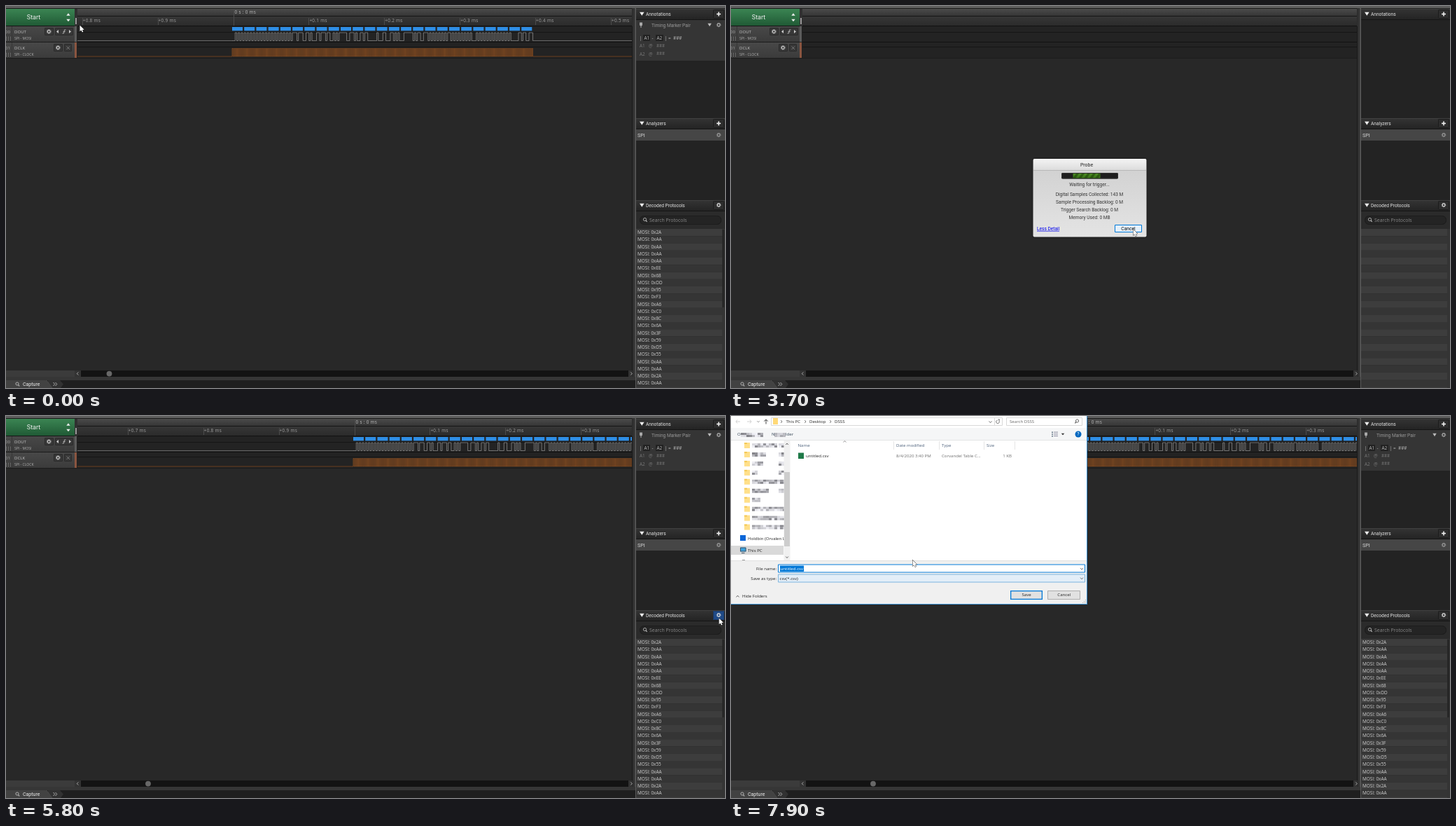
Recreate the animation shown at these times as an HTML page with a canvas. Size 1027x545 px, loop 8 s.

```html
<!DOCTYPE html>
<html lang="en">
<head>
<meta charset="utf-8">
<title>Signal capture</title>
<style>
html, body { margin: 0; width: 100%; height: 100%; overflow: hidden; background: #282828; }
canvas { display: block; }
</style>
</head>
<body>
<canvas id="stage" width="1027" height="545"></canvas>
<script>
const c = document.getElementById('stage').getContext('2d');
const UI = 'Roboto, sans-serif', OPEN = '"Open Sans", sans-serif';
const LOOP = 8000, BYTE = 17.22, BIT = BYTE / 8;
const bytes = [0x2A, 0xAA, 0xAA, 0xAA, 0xAA, 0xEE, 0x68, 0xDD, 0x95, 0xF3, 0xA6, 0xC0, 0x8C,
  0x6A, 0x3F, 0x59, 0xD5, 0x55, 0xAA, 0xAA, 0x2A, 0xAA, 0xAA, 0x83, 0x67];

// start time, pointer x, pointer y
const pointer = [[0, 105, 27], [200, 24, 11], [400, 36, 8], [600, 29, 5], [800, 215, 144],
  [2800, 500, 283], [3100, 607, 342], [3400, 591, 329], [3700, 574, 318], [4000, 581, 309],
  [4300, 565, 306], [4600, 561, 304], [4900, 529, 91], [5200, 828, 324], [5500, 1018, 298],
  [5800, 1018, 288], [6400, 1018, 287], [6700, 972, 319], [7300, 864, 319], [7600, 500, 231],
  [7900, 259, 205]];
// start time, bar offset, samples
const progress = [[800, 5, 10], [2800, 41, 53], [3100, 0, 83], [3400, 0, 113],
  [3700, 16, 143], [4000, 30, 173], [4300, 12, 203]];

const at = (steps, t) => steps.filter(s => s[0] <= t).pop();
const noise = n => Math.abs(Math.sin(n * 12.9898) * 43758.5) % 1;

function box(x, y, w, h, fill, edge, r = 0) {
  c.beginPath();
  c.roundRect(x, y, w, h, r);
  c.fillStyle = fill;
  c.fill();
  if (edge) {
    c.beginPath();
    c.roundRect(x + .5, y + .5, w - 1, h - 1, r);
    c.strokeStyle = edge;
    c.lineWidth = 1;
    c.stroke();
  }
}
function fade(y, h, from, to) {
  const g = c.createLinearGradient(0, y, 0, y + h);
  g.addColorStop(0, from);
  g.addColorStop(1, to);
  return g;
}
function text(s, x, y, color, size = 6.6, font = UI, align = 'left', space = 0) {
  c.font = size + 'px ' + font;
  c.letterSpacing = space + 'px';
  c.textAlign = align;
  c.fillStyle = color;
  c.fillText(s, x, y + size * .35);
}
function line(color, width, ...pts) {
  c.beginPath();
  for (let i = 0; i < pts.length; i += 2) c.lineTo(pts[i], pts[i + 1]);
  c.strokeStyle = color;
  c.lineWidth = width;
  c.stroke();
}
function poly(color, ...pts) {
  c.beginPath();
  for (let i = 0; i < pts.length; i += 2) c.lineTo(pts[i], pts[i + 1]);
  c.fillStyle = color;
  c.fill();
}
function disc(x, y, r, color) {
  c.beginPath();
  c.arc(x, y, r, 0, 7);
  c.fillStyle = color;
  c.fill();
}
function ring(x, y, r, color, width) {
  c.beginPath();
  c.arc(x, y, r, 0, 7);
  c.strokeStyle = color;
  c.lineWidth = width;
  c.stroke();
}
function gear(x, y, color = '#ccc') {
  ring(x, y, 1.9, color, 1.1);
  c.setLineDash([1.1, 1.1]);
  ring(x, y, 2.8, color, 1);
  c.setLineDash([]);
}
function lens(x, y, color, side = -1) {
  ring(x, y - .5, 2.1, color, .9);
  line(color, 1.1, x - side * 1.5, y + 1, x - side * 3.2, y + 2.8);
}
const down = (x, y, w, h, color = '#eee') => poly(color, x - w, y - h, x + w, y - h, x, y + h);
const chevron = (x, y, w, h, color = '#555') => line(color, .8, x - w, y - h, x, y + h, x + w, y - h);

function channel(y, id, name, role) {
  box(0, y, 98, 22, fade(y, 22, '#484848', '#3b3b3b'));
  box(0, y + 22, 98, 1, '#1b1b1b');
  box(8, y, 1, 22, '#363636');
  text(id, -1, y + 8, '#aaa', 6, OPEN);
  for (let i = 0; i < 9; i++) box(i % 3 * 3, y + 15 + (i / 3 | 0) * 2, 1, 1, '#888');
  text(name, 12, y + 8, '#c4c4c4', 6.1, OPEN);
  text(role, 12, y + 17, '#b4b4b4', 5.1, OPEN);
}
function channels() {
  const button = (x, y, w) => box(x, y, w, 11, '#373737', '#2b2b2b', 1);
  channel(29, '00', 'DOUT', 'SPI - MOSI');
  button(55, 31, 13);
  gear(61.3, 36.5);
  button(70, 31, 26);
  poly('#ccc', 75, 34, 75, 39, 72, 36.5);
  poly('#ccc', 90, 34, 90, 39, 93, 36.5);
  line('#bbb', .9, 80.5, 39, 82.5, 39, 83.5, 34, 85.5, 34);
  line('#bbb', .8, 81.5, 36.5, 84.7, 36.5);
  channel(52, '01', 'DCLK', 'SPI - CLOCK');
  button(68, 54, 13);
  gear(74.3, 59.5);
  button(83, 54, 11);
  line('#888', .8, 86.5, 57.5, 91, 62);
  line('#888', .8, 91, 57.5, 86.5, 62);
  box(98, 29, 4, 22, '#5c5c5c');
  box(98, 52, 4, 22, '#8a5540');
  box(101, 29, 1, 45, '#222');
}
function lanes() {
  box(102, 4, 792, 10, fade(4, 10, '#4b4b4b', '#363636'));
  box(102, 14, 792, 1, '#161616');
  box(102, 15, 792, 13, fade(15, 13, '#373737', '#2b2b2b'));
  box(102, 28, 792, 1, '#111');
  for (const y of [29, 52]) {
    box(102, y, 792, 22, '#232323');
    box(102, y + (y === 29 ? 8 : 6), 792, 1, '#151515');
    box(102, y + 22, 792, 1, '#121212');
  }
  box(99, 17, 2, 9, '#999');
  box(895, 17, 2, 9, '#999');
}
function trace(x0) {
  const zero = x0 + 2, end = x0 + 25 * BYTE - 1;
  c.save();
  c.beginPath();
  c.rect(102, 4, 792, 70);
  c.clip();
  for (let k = -3; k < 6; k++) {
    const x = zero + k * 107.9;
    box(Math.floor(x), k ? 17 : 4, 1, k ? 10 : 24, '#4c4c4c');
    if (k) text(`+0.${(k + 10) % 10} ms`, x + .5, 20.5, '#a0a0a0', 6.4, OPEN, 'left', .3);
  }
  text('0 s : 0 ms', zero + 1.5, 9, '#bbb', 6.4, OPEN, 'left', .3);
  const data = [x0, 49.5], clock = [];
  let level = 49.5;
  bytes.forEach((b, i) => {
    const x = x0 + i * BYTE;
    box(x, 30, 15, 5.3, '#2e8ee6');
    for (let j = 0; j < 8; j++) {
      const p = x + j * BIT, next = b >> (7 - j) & 1 ? 38 : 49.5;
      data.push(p, level, p, next);
      level = next;
      clock.push(p, 72, p, 60.5, p + BIT / 2, 60.5, p + BIT / 2, 72);
    }
  });
  data.push(end, level, end, 49.5);
  for (const [from, to] of [[102, x0], [end, 894]]) {
    line('#858585', .7, from, 49.5, to, 49.5);
    line('#8a4a1a', .7, from, 72, to, 72);
  }
  line('#a0a0a0', .65, ...data);
  line('#c2651f', .5, ...clock);
  c.restore();
}
function header(y, name, lit) {
  box(900, y, 127, 16, fade(y, 16, '#343434', '#232323'));
  box(900, y, 127, 1, '#404040');
  box(900, y + 15, 127, 1, '#151515');
  down(908.3, y + 7.3, 3.3, 2.5);
  text(name, 914, y + 8, '#e2e2e2', 6.6);
  box(1010, y + 1, 16, 13, lit ? '#1f4a87' : '#2d2d2d', lit ? '#1b3a66' : '#1c1c1c', 1);
}
function sidebar(full, lit) {
  box(894, 3, 6, 542, '#2a2a2a');
  box(894, 29, 1, 491, '#191919');
  box(895, 3, 3, 542, '#323232');
  box(898, 3, 1, 542, '#4a4a4a');
  box(899, 3, 1, 542, '#5a5a5a');
  box(900, 3, 127, 542, '#232323');
  header(4, 'Annotations');
  header(160, 'Analyzers');
  header(277, 'Decoded Protocols', lit);
  for (const y of [11.5, 167.5]) {
    box(1015, y - .8, 6, 1.6, '#eee');
    box(1017.2, y - 3, 1.6, 6, '#eee');
  }
  gear(1018, 284, '#ddd');
  box(900, 176, 127, 16, '#464646');
  text('SPI', 902, 184, '#d5d5d5', 7.2);
  gear(1018, 184, '#999');
  box(900, 293, 127, 25, '#2b2b2b');
  box(905, 299, 117, 13, '#242424', '#1c1c1c', 6);
  lens(912.5, 305, '#bbb');
  text('Search Protocols', 919, 305.3, '#888', 6.9, OPEN);
  for (let i = 0; i < 23; i++) {
    const y = 318 + i * 10.24;
    box(900, y, 123, 10.24, i % 2 ? '#353535' : '#3d3d3d');
    if (full && i < 22) {
      const hex = bytes[i].toString(16).toUpperCase();
      text('MOSI: 0x' + hex, 902, y + 5, '#d0d0d0', 6.4, OPEN);
    }
  }
  box(1023, 318, 4, 227, '#343434');
  if (!full) return;
  box(1023, 319, 3, 111, '#262626', null, 1);
  box(900, 20, 127, 58, '#353535');
  poly('#aaa', 905, 23.5, 909, 23.5, 909, 27.5, 907.5, 28.5, 907.5, 31, 906.5, 31, 906.5, 28.5, 905, 27.5);
  text('Timing Marker Pair', 922, 27.3, '#999');
  down(1005, 27, 2.7, 2.2, '#bbb');
  gear(1018, 27, '#aaa');
  box(910, 41, 10, 9, '#222');
  box(928, 41, 11, 9, '#222');
  for (const [s, x] of [['|', 905], ['A1', 911.5], ['-', 922.5], ['A2', 929.5], ['|', 941], ['=', 946], ['###', 953]])
    text(s, x, 45.5, '#bbb', 6.4, OPEN);
  ['A1', 'A2'].forEach((s, i) => {
    const y = 57 + i * 11.3;
    text(s, 905, y, '#777', 6.4, OPEN);
    text('@', 918, y, '#777', 6.4, OPEN);
    text('###', 929, y, '#777', 6.2, OPEN);
  });
}
function footer(thumb) {
  box(0, 520, 98, 9, '#3b3b3b');
  box(98, 520, 796, 9, '#333');
  box(107, 520, 782, 9, '#131313');
  line('#bbb', .9, 103.3, 522.5, 101.3, 524.5, 103.3, 526.5);
  line('#bbb', .9, 892.3, 522.5, 894.3, 524.5, 892.3, 526.5);
  if (thumb) disc(thumb, 524.6, 3.9, '#686868');
  box(0, 529, 899, 5, '#363636');
  box(0, 534, 899, 11, '#1f1f1f');
  poly('#313131', 60, 534, 77, 534, 82, 539.5, 78, 545, 60, 545);
  poly('#424242', 0, 534, 58, 534, 66, 545, 0, 545);
  line('#505050', .8, 58, 534, 66, 545);
  lens(16, 539.5, '#bbb');
  text('Capture', 24, 539.5, '#eee', 7);
  for (const x of [67.5, 70.5]) line('#bbb', .9, x, 537, x + 2.3, 539.5, x, 542);
}
function waiting(t) {
  const [, offset, samples] = at(progress, t), hover = t >= 3700 && t < 4000;
  c.shadowColor = 'rgba(0,0,0,.5)';
  c.shadowBlur = 3;
  box(431.5, 218, 162, 111.5, fade(234, 95, '#d2d2d2', '#e4e4e4'), null, 2);
  c.shadowBlur = 0;
  box(432, 218, 161, 16, fade(218, 16, '#f4f4f4', '#dcdcdc'), null, 2);
  box(432, 234, 161, 1, '#b8b8b8');
  text('Probe', 508, 226.8, '#222', 6.9, UI, 'center');
  box(472, 238, 81, 8.5, '#1e1e1e', '#333', 1.5);
  c.save();
  c.beginPath();
  c.rect(472 + offset + .5, 239, 39, 6.5);
  c.clip();
  box(472, 239, 81, 7, fade(239, 7, '#4d8d25', '#356d14'));
  for (let x = 464 + offset; x < 560; x += 8)
    poly('rgba(20,55,5,.5)', x + 5, 239, x + 9, 239, x + 4, 246, x, 246);
  c.restore();
  ['Waiting for trigger...', `Digital Samples Collected: ${samples} M`, 'Sample Processing Backlog: 0 M',
    'Trigger Search Backlog: 0 M', 'Memory Used: 0 MB'].forEach((s, i) =>
    text(s, 512, i ? 258 + i * 10.8 : 254.3, '#333', 6.6, UI, 'center'));
  text('Less Detail', 437, 317.8, '#00e');
  box(437, 320.8, 32, .7, '#00e');
  box(548, 312, 39, 11, hover ? '#e5f1fb' : '#e1e1e1', '#0078d7');
  if (!hover) box(549, 313, 37, 9, '#e1e1e1', '#5aa5df');
  text('Cancel', 567.5, 317.8, '#111', 6.7, UI, 'center');
}
function menu(t) {
  box(916, 292, 111, 56, '#333', '#5a5a5a');
  if (t >= 6700) box(922, 311, 103, 17, '#1e4a86');
  ['Export search results', 'Export as text/csv', 'Clear search'].forEach((s, i) =>
    text(s, 926, 302.5 + i * 17, '#ddd'));
}
function mosaic(x, y, w, seed) {
  for (let i = 0; i < w; i += 4)
    for (let j = 0; j < 2; j++) {
      const v = 130 + 115 * noise(seed + i * 3 + j * 7.3) | 0;
      box(x + i, y - 3 + j * 3, 4, 3, `rgb(${v},${v},${v + 6})`);
    }
}
function saveAs(t) {
  const say = (s, x, y, color = '#222', align) => text(s, x, y, color, 6.1, OPEN, align);
  const seed = Math.floor((t - 7300) / 300) * 31;
  box(0, 0, 509, 269, '#f0f0f0');
  box(0, 0, 508, 206, '#fff');
  for (const [x, d] of [[10, -1], [26, 1]]) {
    line('#ccc', .9, x - 3, 8, x + 3, 8);
    line('#ccc', .9, x + d, 5.5, x + d * 3, 8, x + d, 10.5);
  }
  chevron(39, 8, 1.8, .8, '#888');
  line('#444', 1, 50, 11.5, 50, 5);
  line('#444', 1, 47.3, 7.5, 50, 5, 52.7, 7.5);
  box(57, 2, 331, 12, '#fff', '#d9d9d9');
  box(376, 2, 1, 12, '#d9d9d9');
  box(60, 3, 7, 9, '#ffd978');
  for (const x of [72, 106, 142]) line('#555', .8, x - .8, 6, x + 1, 8, x - .8, 10);
  say('This PC', 78.5, 8);
  say('Desktop', 112, 8);
  say('DSSS', 148, 8);
  chevron(370.5, 8.5, 2, 1.1);
  c.beginPath();
  c.arc(381, 8.3, 2.3, -.6, 4.6);
  c.strokeStyle = '#555';
  c.lineWidth = .8;
  c.stroke();
  poly('#555', 381.5, 4.5, 383.8, 4.8, 383.2, 7.3);
  box(393, 2, 109, 12, '#fff', '#d9d9d9');
  say('Search DSSS', 398, 8.3, '#666');
  lens(494.5, 7.5, '#555', 1);
  box(0, 17, 508, 17, '#f5f6f7');
  box(0, 34, 508, 1, '#e3e4e5');
  say('O', 9, 26, '#345');
  mosaic(14, 27, 31, seed + 2);
  say('N', 58, 26, '#345');
  mosaic(62, 27, 16, seed + 9);
  say('lder', 78, 26, '#345');
  for (let i = 0; i < 3; i++) {
    box(458, 22.5 + i * 2.7, 2, 1.5, '#678');
    box(461, 22.5 + i * 2.7, 6, 1.2, '#99a');
  }
  down(474, 26, 2.3, 1.3, '#333');
  disc(496, 26, 4.5, '#0067c0');
  text('?', 496, 26, '#fff', 7, UI, 'center');

  for (let i = 0; i < 10; i++) {
    const y = 42 + i * 12.95;
    box(19, y - 4, 8, 8, '#ffe08a');
    box(19, y - 4, 4, 2, '#f4c958');
    mosaic(30, y, [36, 20, 16, 8, 46, 22, 12, 46, 46, 46][i], seed + i * 17);
    if (i < 4 || i === 5) mosaic(68, y, 6, seed + i * 5);
  }
  box(13, 170, 8, 8, '#0a66d8');
  say('Holdbin (Orvalen L', 24, 174.5);
  box(0, 185, 75, 13, '#d9d9d9');
  box(13, 187.5, 8.5, 6, '#3ba3e0', '#456');
  box(15, 195, 4.5, 1, '#456');
  say('This PC', 24, 191.7);
  box(16, 205, 4, 1.5, '#999');
  box(75.5, 35, 9, 171, '#f0f0f0');
  box(76, 80, 8, 106, '#cdcdcd');
  chevron(80, 40, 1.8, -1, '#444');
  chevron(80, 201.5, 1.8, 1, '#444');
  chevron(162.5, 36.5, 2, -.9, '#777');
  for (const x of [232, 297, 361, 405]) box(x, 36, 1, 12, '#e5e5e5');
  [['Name', 95.5], ['Date modified', 236], ['Type', 301], ['Size', 365]].forEach(([s, x]) =>
    say(s, x, 41.7, '#4c607a'));
  box(96, 52.5, 8, 8.5, '#1f7a48');
  say('untitled.csv', 107, 57);
  say('8/4/2020 3:40 PM', 236, 57, '#6d6d6d');
  say('Corvandel Table C...', 301, 57, '#6d6d6d');
  say('1 KB', 401, 57, '#6d6d6d', 'right');
  box(0, 206, 508, 1, '#e0e0e0');
  say('File name:', 65, 218, '#222', 'right');
  say('Save as type:', 65, 231.7, '#222', 'right');
  box(67, 211.5, 439, 12, '#fff', '#0078d7');
  box(70, 213.5, 34, 8.5, '#0078d7');
  say('untitled.csv', 70.5, 217.7, '#fff');
  box(67, 225.5, 439, 12, '#e3eef8', '#7fb5dd');
  say('csv(*.csv)', 69.5, 231.7);
  chevron(501, 218, 2, 1.1);
  chevron(501, 231.7, 2, 1.1);
  chevron(9.5, 257.3, 2, -1.1, '#333');
  say('Hide Folders', 16, 257);
  box(399, 249, 46, 13, '#0078d7');
  box(400.3, 250.3, 43.4, 10.4, '#e1e1e1');
  say('Save', 422, 255.3, '#222', 'center');
  box(452, 249, 47, 13, '#e1e1e1', '#adadad');
  say('Cancel', 475.7, 255.3, '#222', 'center');
  for (let i = 0; i < 3; i++)
    for (let j = 0; j <= i; j++) box(506 - j * 2, 262 + i * 2, 1, 1, '#b0b0b0');
  box(508, 0, 1, 269, '#3a8fd0');
  box(0, 268, 509, 1, '#3a8fd0');
}
function arrow(x, y) {
  c.beginPath();
  for (const [a, b] of [[0, 0], [0, 8.8], [2, 7], [3.4, 10], [4.8, 9.4], [3.5, 6.5], [6.2, 6.3]])
    c.lineTo(x + .5 + a, y + .4 + b);
  c.closePath();
  c.strokeStyle = '#111';
  c.lineWidth = .9;
  c.lineJoin = 'round';
  c.stroke();
  c.lineJoin = 'miter';
  c.fillStyle = '#fff';
  c.fill();
}
function draw(t) {
  const busy = t >= 800 && t < 4600, before = t < 800, hover = t >= 200 && before;
  box(0, 0, 1027, 545, '#282828');
  box(0, 0, 1027, 3, '#5d5d5d');
  box(0, 3, 1027, 1, '#1a1a1a');
  box(98, 4, 4, 25, '#303030');
  box(0, 4, 98, 24, hover ? fade(4, 24, '#4aa568', '#287543') : fade(4, 24, '#3b8553', '#205a35'));
  box(0, 28, 98, 1, '#151515');
  text('Start', 39.5, 16, '#f0f0f0', 9, UI, 'center');
  down(89, 12, 2.7, -1.7);
  down(89, 20.5, 2.7, 1.7);
  channels();
  lanes();
  if (!busy) trace(before ? 323 : 496);
  box(0, 74, 894, 1, '#1c1c1c');
  sidebar(!busy, t >= 5800 && t < 7000);
  footer(busy ? 0 : before ? 147.5 : 203);
  if (busy) waiting(t);
  if (t >= 6100 && t < 7000) menu(t);
  if (t >= 7300) saveAs(t);
  const [, x, y] = at(pointer, t);
  arrow(x, y);
}
const begin = performance.now();
function tick() {
  draw((performance.now() - begin) % LOOP);
  requestAnimationFrame(tick);
}
tick();
</script>
</body>
</html>
```
